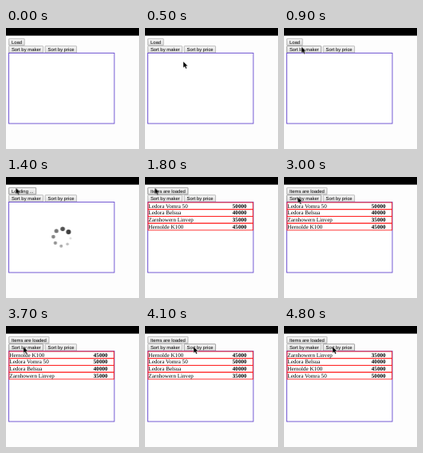
These frames come from a looping animation (167 px wide and 152 px high, 4900 ms). An HTML page:

```html
<!DOCTYPE html>
<html lang="en">
<head>
<meta charset="utf-8">
<title>Sortable list</title>
<style>
  html, body { margin: 0; width: 100%; height: 100%; overflow: hidden; background: #fdfdfd; }
  svg { display: block; width: 167px; height: 152px; }
  text { text-rendering: geometricPrecision; fill: #000; }
  .btn rect { fill: url(#face); stroke: #a2a2a2; stroke-width: .7; }
  .btn text { font: 5.92px "Liberation Sans", Arial, sans-serif; }
  .row rect { fill: none; stroke: #f22; stroke-width: .9; }
  .row text { font: 7.1px "Liberation Serif", "Times New Roman", serif; }
  .row .price { font-weight: bold; }
</style>
</head>
<body>
<svg id="stage" viewBox="0 0 167 152">
  <defs>
    <linearGradient id="face" x2="0" y2="1">
      <stop stop-color="#f7f7f7"/>
      <stop offset="1" stop-color="#dcdcdc"/>
    </linearGradient>
  </defs>
  <rect width="167" height="152" fill="#fdfdfd"/>
  <rect width="167" height="9.6"/>
  <g id="buttons"></g>
  <rect x="3.5" y="31.5" width="132.5" height="88.5" fill="#fff" stroke="#6547cf" stroke-width=".9"/>
  <g id="spinner"><g id="dots"></g></g>
  <g id="rows"></g>
  <path id="cursor" d="M0 0V8L1.9 6.4L3.2 9.2L4.6 8.6L3.4 5.8H5.8Z" stroke="#fff" stroke-width=".4"/>
</svg>
<script>
const LOOP = 4900, PITCH = 8.7;
const $ = id => document.getElementById(id);

function add(parent, tag, attrs = {}, label = '') {
  const el = document.createElementNS('http://www.w3.org/2000/svg', tag);
  for (const key in attrs) el.setAttribute(key, attrs[key]);
  el.textContent = label;
  return parent.appendChild(el);
}

// Holds each value from its time in ms until the next one.
function hold(el, prop, steps) {
  const frames = steps.map(([ms, value]) => ({ offset: ms / LOOP, [prop]: value, easing: 'step-end' }));
  frames.push({ offset: 1, [prop]: steps[steps.length - 1][1] });
  el.animate(frames, { duration: LOOP, iterations: Infinity });
}

function show(el, from, to) {
  const steps = from > 0 ? [[0, 0], [from, 1]] : [[0, 1]];
  if (to < LOOP) steps.push([to, 0]);
  hold(el, 'opacity', steps);
}

const move = (el, steps) =>
  hold(el, 'transform', steps.map(([ms, x, y]) => [ms, `translate(${x}px, ${y}px)`]));

function button(x, y, width, label) {
  const g = add($('buttons'), 'g', { class: 'btn' });
  const face = add(g, 'rect', { x: x + .4, y: y + .4, width: width - .8, height: 8.5, rx: .5 });
  add(g, 'text', { x: x + 3.7, y: y + 6.8 }, label);
  return { g, face };
}

function hover(face, spans) {
  const steps = [[0, '#a2a2a2']];
  for (const [from, to] of spans) {
    steps.push([from, '#777']);
    if (to < LOOP) steps.push([to, '#a2a2a2']);
  }
  hold(face, 'stroke', steps);
}

const load = button(3.2, 13, 20.4, 'Load');
const loading = button(3.2, 13, 34.9, 'Loading ...');
const loaded = button(3.2, 13, 51.2, 'Items are loaded');
const maker = button(3.2, 22.3, 43.9, 'Sort by maker');
const price = button(48.8, 22.3, 40.2, 'Sort by price');

show(load.g, 0, 1300);
show(loading.g, 1300, 1800);
show(loaded.g, 1800, LOOP);
hover(load.face, [[1000, 1300]]);
hover(loading.face, [[1300, 1800]]);
hover(loaded.face, [[1800, 2200]]);
hover(maker.face, [[700, 1000], [2300, 3900]]);
hover(price.face, [[4000, LOOP]]);

// Dots trail anticlockwise behind the darkest one.
const greys = [62, 82, 118, 136, 148, 170, 190, 222];
greys.forEach((v, i) => {
  const a = (-40 - 45 * i) * Math.PI / 180;
  add($('dots'), 'circle', {
    cx: 10.8 * Math.cos(a), cy: 10.8 * Math.sin(a),
    r: 3 - .21 * i, fill: `rgb(${v},${v},${v})`
  });
});
$('spinner').setAttribute('transform', 'translate(70.2 76)');
show($('spinner'), 1300, 1800);
hold($('dots'), 'transform',
  [0, 1400, 1500, 1600, 1700].map((ms, i) => [ms, `rotate(${45 * (i - 1)}deg)`]));

// Slots: as loaded, first sort by maker, second sort by maker, sort by price.
const sorts = [0, 3100, 3700, 4800];
const cars = [
  ['Ledora Vomra 50', 50000, [0, 2, 1, 3]],
  ['Ledora Belsua', 40000, [1, 1, 2, 1]],
  ['Zarnhowern Linvep', 35000, [2, 3, 3, 0]],
  ['Hernolde K100', 45000, [3, 0, 0, 2]]
];
for (const [name, cost, slots] of cars) {
  const row = add($('rows'), 'g', { class: 'row' });
  add(row, 'rect', { x: 3.9, y: 32, width: 131.7, height: PITCH });
  add(row, 'text', { x: 4.3, y: 38.7 }, name);
  add(row, 'text', { x: 109.8, y: 38.7, class: 'price' }, cost);
  move(row, slots.map((slot, i) => [sorts[i], 0, slot * PITCH]));
}
show($('rows'), 1800, LOOP);

show($('cursor'), 300, LOOP);
move($('cursor'), [
  [0, 65, 59.5], [400, 58, 52], [500, 48, 42], [600, 38, 34], [700, 30, 28], [800, 25, 25],
  [900, 22, 23.5], [1000, 16, 18], [1100, 12.3, 13.5],
  [2100, 13, 17], [2200, 15, 21], [2300, 17, 24], [3000, 17.2, 25], [3200, 21.8, 26],
  [3800, 30, 26.5], [3900, 43, 27], [4000, 54, 26.5], [4100, 61, 26]
]);
</script>
</body>
</html>
```
